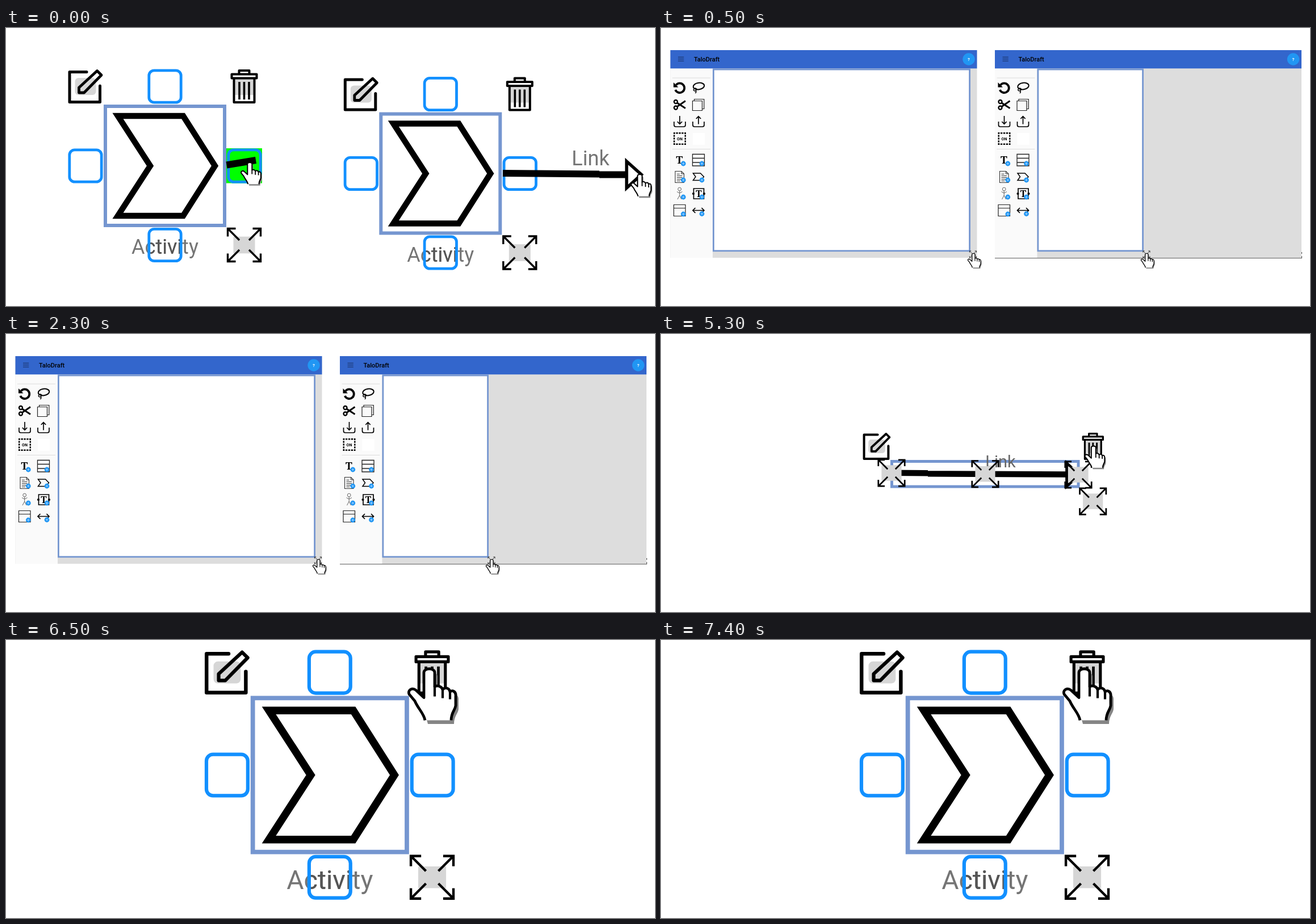
An HTML page that plays this animation: 1143x490 px, repeating every 8 s.

```html
<!DOCTYPE html>
<html lang="en">
<head>
<meta charset="utf-8">
<title>Diagram editor tour</title>
<style>
html, body { margin: 0; width: 100%; height: 100%; overflow: hidden; background: #fff; }
svg { display: block; width: 100%; height: 100%; }
text { font-family: Roboto, sans-serif; }
.serif { font-family: "Noto Serif", "Liberation Serif", serif; font-weight: 700; }
</style>
</head>
<body>
<svg id="stage" viewBox="0 0 1143 490"></svg>
<script>
const FRAME = '#7596d0', BLUE = '#1290ff', BADGE = '#2196f3', GREY = '#d6d6d6';

const at = (x, y, scale, body) => `<g transform="translate(${x} ${y}) scale(${scale})">${body}</g>`;
const line = (d, width, color = '#000', extra = '') =>
  `<path d="${d}" fill="none" stroke="${color}" stroke-width="${width}" ${extra}/>`;
const box = (x, y, w, h, fill, extra = '') =>
  `<rect x="${x}" y="${y}" width="${w}" height="${h}" fill="${fill}" ${extra}/>`;
const label = (x, y, size, str, color = '#757575', extra = 'text-anchor="middle"') =>
  `<text x="${x}" y="${y}" font-size="${size}" fill="${color}" ${extra}>${str}</text>`;
const ROUND = 'stroke-linejoin="round"';

// Handles around a selection, each centred on its own origin
const edit = () =>
  box(-18.5, -15, 37, 30, GREY, 'rx="6"') +
  line('M2 -25.5H-28V27.5H25.5V-1', 5, '#000', ROUND + ' stroke-linecap="round"') +
  line('M20.5 -27.5L28 -20L-2.5 11H-11.5V2Z', 4.8, '#000', ROUND);

const trash = () =>
  box(-18.5, -15, 37, 30, GREY) +
  line('M-9 -22V-28H9V-22M-22 -21.5H22V-14.5H-22ZM-18 -14V28H18V-14', 4, '#000', ROUND) +
  line('M-8.5 -8V23M0 -8V23M8.5 -8V23', 3.6);

const resize = (half = 19) => {
  const arrow = [0, 90, 180, 270].map(a =>
    `<g transform="rotate(${a})">${line('M-15 -29H-29V-15M-29 -29L-8.5 -8.5', 3.4)}</g>`);
  return box(-half, -half * .78, half * 2, half * 1.56, GREY) + arrow.join('');
};

const port = (x, y) =>
  box(x - 28.2, y - 28.2, 56.4, 56.4, 'none', `rx="9" stroke="${BLUE}" stroke-width="4.8"`);

function activity(x, y, scale) {
  return at(x, y, scale,
    box(-105, -105, 210, 210, '#fff', `stroke="${FRAME}" stroke-width="6"`) +
    line('M-83 -88H32L88 0L32 88H-83L-26 0Z', 10.4) +
    label(0, 155.3, 36, 'Activity') +
    // the caption reads darker through the lower port
    label(0, 155.3, 36, 'Activity', '#555', 'text-anchor="middle" clip-path="url(#port)"') +
    port(0, -140) + port(-140, 0) + port(140, 0) + port(0, 139.5) +
    at(-140, -140, 1, edit()) + at(139.5, -140, 1, trash()) + at(139.5, 139.5, 1, resize()));
}

// Pointing hand, origin at the fingertip
function hand(x, y, scale) {
  const d = 'M-8 92C-10 80-20 72-26 58L-36 46C-39 38-30 34-24 39L-10 52V8C-10-1 9-1 9 8V33' +
    'C12 30 21 31 23 38C27 33 35 35 36 42C40 38 47 41 46 50V66C45 74 38 78 38 92';
  return at(x, y, scale,
    `<path d="${d}Z" fill="#858585" transform="translate(5 6.5)"/>` +
    `<path d="${d}" fill="#fff" stroke="#000" stroke-width="4.8" stroke-linejoin="round"/>` +
    line('M9 32V50M23 38V53M36 42V55', 4.2));
}

const head = (d, width) =>
  `<path d="${d}" fill="#fff" stroke="#000" stroke-width="${width}"/>`;

const plus = (x, y) =>
  `<circle cx="${x}" cy="${y}" r="4.4" fill="${BADGE}"/>` +
  line(`M${x - 2.2} ${y}h4.4M${x} ${y - 2.2}v4.4`, .9, '#b5dcff');

function tools() {
  const tray = x => `M${x - 10} 165V171Q${x - 10} 174 ${x - 7} 174H${x + 7}Q${x + 10} 174 ${x + 10} 171V165`;
  return [
    line('M26.5 100.5A8.3 8.3 0 1 1 25.3 109', 3.8),
    '<path d="M22 96V104.5H30.5Z"/>',
    '<ellipse cx="66.5" cy="102.5" rx="9.8" ry="5.8" fill="none" stroke="#000" stroke-width="2" transform="rotate(-8 66.5 102.5)"/>',
    line('M58 107.5a2.4 2 0 1 0 4 2a2.4 2 0 1 0 -4 -2M61.5 110.5Q62.5 113 60.5 115', 1.5),
    line('M28.5 132L43 141.5M28.5 138.5L43 128.5', 2.8),
    '<g fill="none" stroke="#000" stroke-width="2.3"><circle cx="26" cy="130" r="3"/><circle cx="26" cy="140.5" r="3"/></g>',
    line('M55.5 128.5H72.5V145.5H55.5ZM58.5 128V125.5H75.8V142.5H73', 1.2, '#222'),
    line(tray(33) + 'M33 155V169M28.8 165L33 169.2L37.2 165', 1.7),
    line(tray(66) + 'M66 169.5V156M61.8 160L66 155.8L70.2 160', 1.7),
    line('M23.2 185.2H42.8V204.8H23.2Z', 2.4, '#000', 'stroke-dasharray="3.3 1.6" stroke-dashoffset="1.6"'),
    label(33, 197.6, 7, 'ON', '#000', 'text-anchor="middle" font-weight="700"'),
    box(56, 185, 21, 21, '#fff'),
    label(32.5, 239, 18, 'T', '#000', 'text-anchor="middle" class="serif"'),
    line('M55.5 222.5H76.5V243H55.5ZM55.5 229.5H76.5M55.5 237H76.5', 1.3, '#222'),
    line('M25 252.5H36L40.5 257V272.5H25ZM36 252.5V257H40.5M28 257.5H33M28 260.5H37.5M28 263.5H37.5M28 266.5H37.5M28 269.5H34', 1.1, '#333'),
    line('M56.5 256H69.5L75.5 262.3L69.5 268.5H56.5L61 262.3Z', 1.5),
    '<circle cx="32.7" cy="284" r="2.9" fill="none" stroke="#666"/>',
    line('M32.7 287V295L29 302M32.7 295L36 302M28 288.5L32.7 291L37.5 288.5', 1, '#666'),
    line('M57.5 283H75.5V301H57.5Z', 1.7),
    '<circle cx="57" cy="292" r="2.1"/><circle cx="76" cy="292" r="2.1"/>',
    label(66.5, 297.8, 16, 'T', '#000', 'text-anchor="middle" class="serif"'),
    line('M22.5 311.5H43V331.5H22.5ZM22.5 317.5H43', 1.2, '#222'),
    line('M56 321.5H76M60.5 317L56 321.5L60.5 326M71.5 317L76 321.5L71.5 326', 1.7),
    ...[239, 268, 298, 328].map(y => plus(39.3, y)),
    ...[239, 268, 298, 327.5].map(y => plus(72, y))
  ].join('');
}

// Editor window; right is the outer edge of the drawing area
function editor(dx, right) {
  return at(dx, 0, 1,
    box(16.5, 39, 540, 366, '#ddd') +
    box(16.5, 71, 74.5, 334, '#fafafa') +
    box(16.5, 39, 540, 32.3, '#3366cc') +
    line('M30 51.3H40.3M30 54.7H40.3M30 58.1H40.3', 1, '#172c59') +
    label(58, 59.3, 11, 'TaloDraft', '#000', 'font-weight="500"') +
    `<circle cx="542" cy="55" r="10.7" fill="${BADGE}"/>` +
    label(542, 57.8, 8, '?', '#fff', 'text-anchor="middle" font-weight="700"') +
    line('M20 88H87M20 213.5H87', 1, '#dcdcdc') +
    tools() +
    box(92.4, 73, right - 93.8, 319.8, '#fff', `stroke="${FRAME}" stroke-width="2.8"`));
}

const ports = () =>
  activity(280, 243, 1) +
  box(388, 212, 63, 61.5, '#0f0') + port(420, 243) +
  line('M388.5 241.5L440 233', 12) + hand(429.5, 236.5, .42) +
  activity(765.3, 256.5, 1) +
  label(1029.5, 241.7, 36, 'Link') +
  line('M875 256L1045 257.6M1045 258.6H1092', 12) +
  head('M1093 235L1119 258.3L1093 282Z', 5.5) + hand(1116.5, 257.5, .425);

const canvases = () =>
  editor(0, 545) + at(549.5, 399, .21, resize()) + hand(550.5, 397, .275) +
  editor(571.5, 278.5) + line('M588 405.7H1129', 1, '#555') + line('M1128.5 395V398M1128.5 402V405', 1, '#444') +
  at(855, 399, .21, resize()) + hand(855.5, 397, .275);

const link = () =>
  box(406.5, 224.5, 328.5, 44.5, '#fff', `stroke="${FRAME}" stroke-width="5"`) +
  label(598, 235, 29, 'Link', '#666') +
  line('M408 244.8L470 245.3M470 246.2L716 247.5', 10.5) +
  head('M714.5 227.5L737 248L714.5 268.5Z', 4.8) +
  at(380, 198, .8, edit()) + at(760.8, 198, .8, trash()) +
  [[406, 245], [571, 246.7], [735, 248], [760.7, 295]].map(([x, y]) => at(x, y, .8, resize(22))).join('') +
  hand(762, 197, .42);

const shape = () => activity(570.3, 238, 1.292) + hand(746, 49.5, 1);

const LOOP = 8000;
const scenes = [[0, ports], [500, canvases], [3500, link], [6500, shape]];
const stage = document.getElementById('stage');
stage.innerHTML = `<clipPath id="port">${box(-28, 111, 56, 56, '#000')}</clipPath>` +
  scenes.map(([, draw]) => `<g class="scene" display="none">${draw()}</g>`).join('');
const groups = stage.querySelectorAll('.scene');
const start = performance.now();

function update(now) {
  const t = Math.max(0, now - start) % LOOP;
  const current = scenes.filter(([from]) => t >= from).length - 1;
  groups.forEach((g, i) => g.setAttribute('display', i === current ? 'inline' : 'none'));
}

function tick(now) {
  update(now);
  requestAnimationFrame(tick);
}
update(start);
requestAnimationFrame(tick);
</script>
</body>
</html>
```
